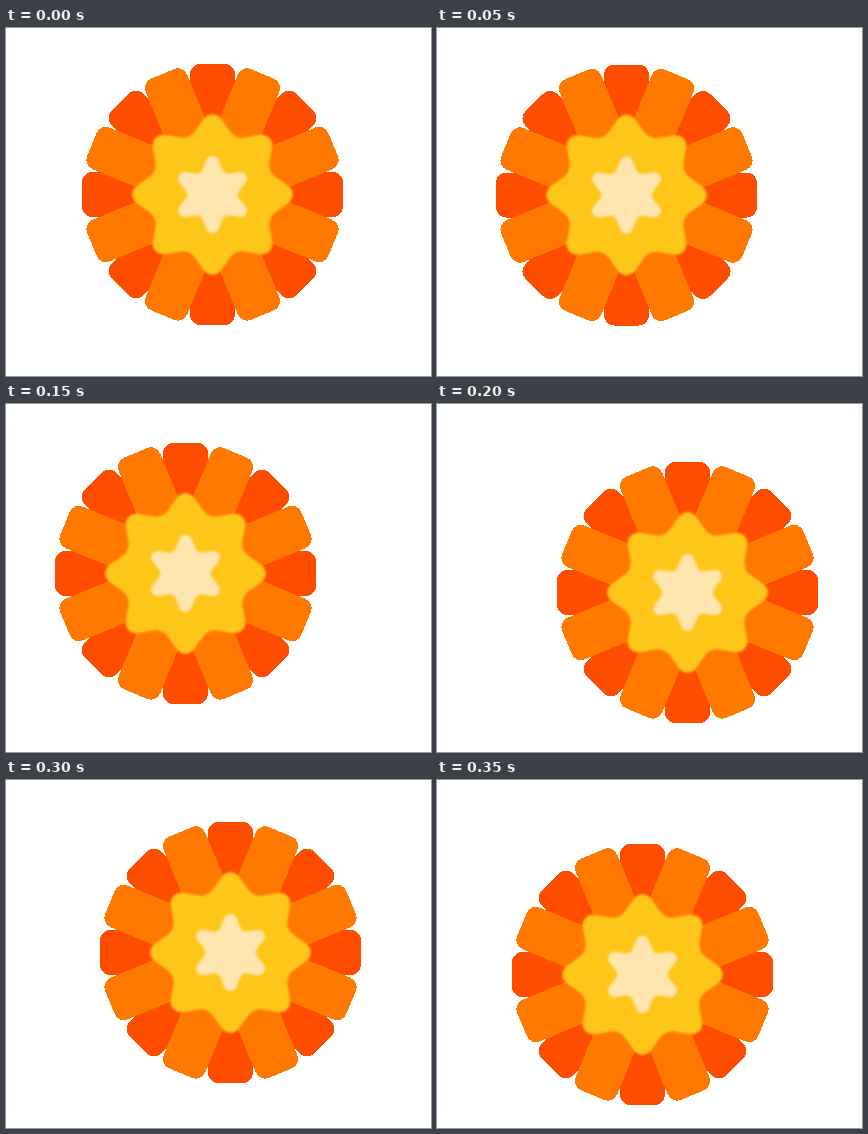
Recreate the animation shown at these times as an HTML page. Size 425 by 348 pixels, loop 0.4 s.

```html
<!DOCTYPE html>
<html>
<head>
<meta charset="utf-8">
<style>
  html, body { margin: 0; width: 100%; height: 100%; overflow: hidden; background: #fff; }
  svg { display: block; }
  .petals { shape-rendering: crispEdges; }
  .stars { filter: blur(0.8px); }
</style>
</head>
<body>
<svg width="425" height="348">
  <g id="flower">
    <g class="petals" id="petals"></g>
    <g class="stars" id="stars"></g>
  </g>
</svg>
<script>
const STEP = 50;
const byId = id => document.getElementById(id);

function petals(color, startAngle) {
  for (let angle = startAngle; angle < 360; angle += 45) {
    byId('petals').innerHTML +=
      `<rect x="-22.5" y="-130.5" width="45" height="120" rx="10" fill="${color}" transform="rotate(${angle})"/>`;
  }
}

// Star whose tips and valleys are both rounded by tangent arcs
function star(color, points, outer, inner, tipRadius, valleyRadius) {
  const step = Math.PI / points;
  const tipAngle = Math.atan2(inner * Math.sin(step), outer - inner * Math.cos(step));
  const vertex = i => {
    const radius = i % 2 ? inner : outer;
    return [radius * Math.sin(i * step), -radius * Math.cos(i * step)];
  };
  const toward = ([x, y], [tx, ty], distance) => {
    const k = distance / Math.hypot(tx - x, ty - y);
    return [x + (tx - x) * k, y + (ty - y) * k];
  };
  let path = '';
  for (let i = 0; i < points * 2; i++) {
    const valley = i % 2;
    const radius = valley ? valleyRadius : tipRadius;
    const cut = radius / Math.tan(tipAngle + valley * step);
    const corner = vertex(i);
    const from = toward(corner, vertex(i + points * 2 - 1), cut);
    const to = toward(corner, vertex(i + 1), cut);
    path += `${i ? 'L' : 'M'}${from}A${radius},${radius} 0 0 ${1 - valley} ${to}`;
  }
  byId('stars').innerHTML += `<path d="${path}Z" fill="${color}"/>`;
}

petals('#ff4d00', 0);
petals('#ff7800', 22.5);
star('#ffc61a', 8, 88, 60, 10.5, 16);
star('#ffe5ae', 6, 49.5, 23.5, 6.5, 7);

// Key points of the shake; each half of the loop visits three in four steps
const keyPoints = [
  [206.5, 166.5], [172.5, 167.5], [179.5, 169.5],
  [250.5, 188.5], [224.5, 172.5], [205.5, 194.5]
];

function flowerCentre(step) {
  const half = Math.floor(step / 4);
  const phase = step % 4;
  const position = half * 3 + (phase < 2 ? phase / 2 : phase - 1);
  const a = keyPoints[Math.floor(position)];
  const b = keyPoints[Math.ceil(position)];
  return a.map((value, axis) => (value + b[axis]) / 2);
}

const start = performance.now();
function tick() {
  const step = Math.floor((performance.now() - start) / STEP) % 8;
  byId('flower').setAttribute('transform', `translate(${flowerCentre(step)})`);
  requestAnimationFrame(tick);
}
tick();
</script>
</body>
</html>
```
